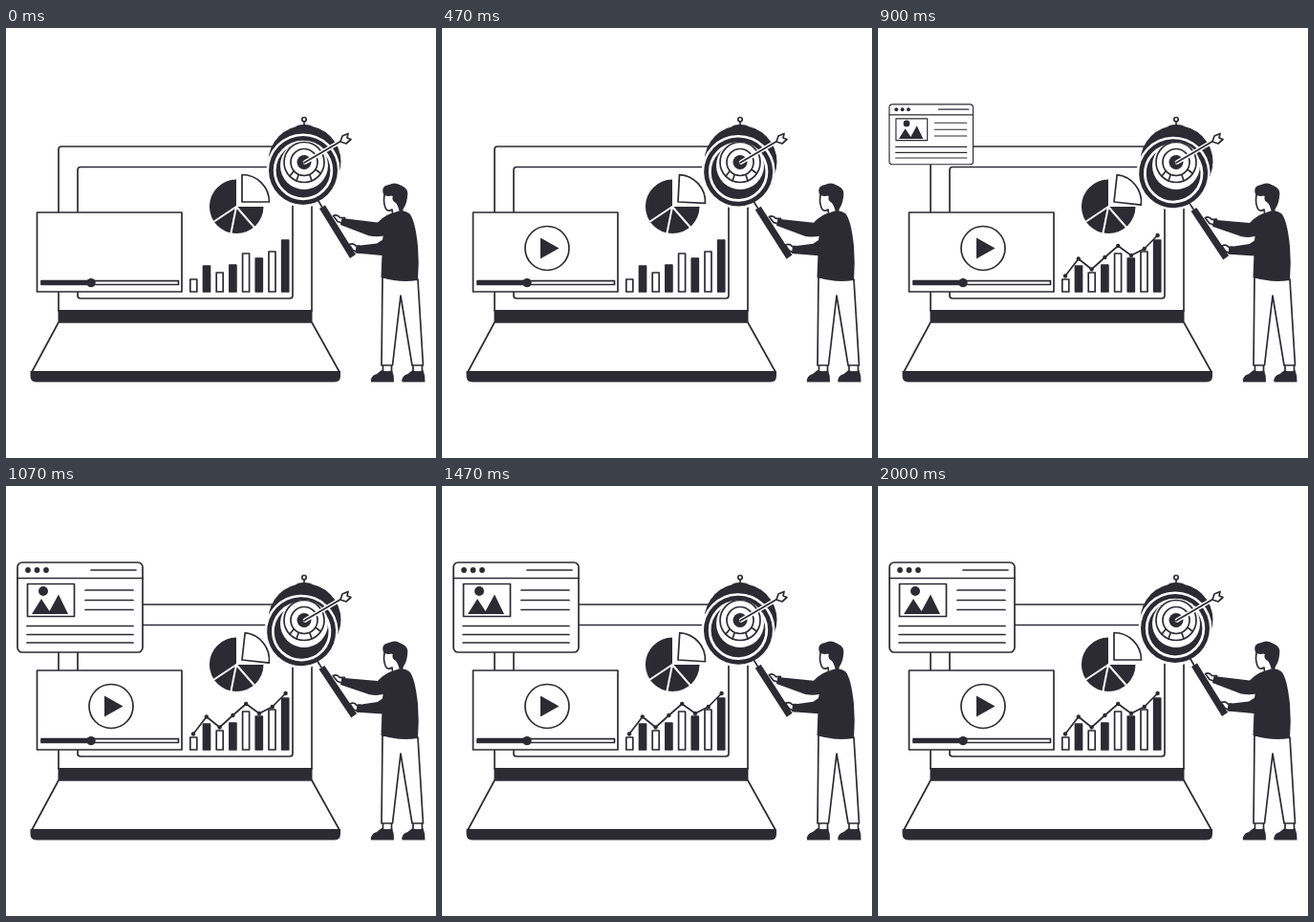
Write an HTML page that moves like this. It is 450 px wide and 450 px high and loops after 2170 ms.

```html
<!DOCTYPE html>
<html lang="en">
<head>
<meta charset="utf-8">
<title>Analytics illustration</title>
<style>
html, body { margin: 0; width: 100%; height: 100%; overflow: hidden; background: #fff; }
svg { display: block; width: 100vw; height: 100vh; }
.o { fill: #fff; stroke: #2c2b33; stroke-width: 1.7; stroke-linejoin: round; stroke-linecap: round; }
.l { fill: none; stroke: #2c2b33; stroke-width: 1.7; stroke-linejoin: round; stroke-linecap: round; }
.d { fill: #2c2b33; }
.w { fill: none; stroke: #fff; stroke-width: 2; stroke-linecap: round; }
</style>
</head>
<body>
<svg viewBox="0 0 450 450">
  <defs>
    <clipPath id="reveal"><rect id="wipe" x="190" y="205" width="0" height="70"/></clipPath>
  </defs>

  <g id="laptop">
    <path class="o" d="M55 296V127q0-3 3-3H317q3 0 3 3V296z"/>
    <rect class="o" x="75" y="145.500" width="225" height="137.500" rx="3"/>
    <path class="o" d="M55 308H320L349 360H27z"/>
    <path class="d" d="M54.500 295H320.500V308H54.500zM25.500 359H350V364q0 6.500-6 6.500H31.500q-6 0-6-6.500z"/>
  </g>

  <g id="pie">
    <path class="d" d="M241 187V158.500A28.300 28.300 0 1 0 269.500 187z"/>
    <path class="w" d="M241 187L217 203M241 187L235 217M241 187L262 211"/>
    <path id="slice" class="o" d="M247 182V153.500A28.500 28.500 0 0 1 275.500 182z"/>
  </g>

  <g id="bars"></g>
  <g id="trend" clip-path="url(#reveal)"></g>

  <g id="window">
    <rect class="o" x="12" y="80" width="131" height="94" rx="5"/>
    <path class="l" d="M12 96.500H143M89 88H136M83 109H133M83 119.500H133M83 129.500H133M22 146.500H133M22 155.500H133M22 164H133"/>
    <circle class="d" cx="23" cy="88" r="2.900"/>
    <circle class="d" cx="32.500" cy="88" r="2.900"/>
    <circle class="d" cx="42" cy="88" r="2.900"/>
    <rect class="o" x="22.500" y="102.500" width="49" height="34"/>
    <circle class="d" cx="39" cy="110" r="5"/>
    <path class="d" d="M27 134L37 118L45.500 131L55 113.500L65 134z"/>
  </g>

  <g id="player">
    <rect class="o" x="32.500" y="193" width="151.500" height="83"/>
    <rect class="o" x="37" y="264.700" width="143.500" height="3.800"/>
    <rect class="d" x="37" y="264.500" width="52" height="4.200"/>
    <circle class="d" cx="89" cy="266.600" r="4.700"/>
  </g>
  <g id="play">
    <circle class="o" cx="110" cy="230.500" r="23"/>
    <path class="d" d="M103 219.500V241.500L122.500 230.500z"/>
  </g>

  <g id="target">
    <circle class="o" cx="312" cy="95.700" r="2.200"/>
    <path class="l" d="M312 98.500V102"/>
    <path class="d" d="M303 104q1-3 9-3t9 3z"/>
    <circle class="d" cx="312.500" cy="140" r="38"/>
  </g>

  <g id="arm">
    <path d="M330 187L361 239" stroke="#fff" stroke-width="10"/>
    <path class="d" d="M328 189L334 185.500L366 237L360 241z"/>
    <circle cx="311" cy="149" r="35" fill="none" stroke="#fff" stroke-width="7"/>
    <path class="l" d="M327 181L330.500 187"/>
    <circle class="d" cx="311" cy="149" r="36"/>
    <circle class="w" cx="311" cy="149" r="29.800" style="stroke-width:2.800"/>
    <path class="o" d="M354 205L347 202.500L342.500 196.500q4-2 7 2l5 0zM369 235L363 232.500L359 226.500q5-2 7 1.500l4 0z"/>
    <path class="d" d="M408 193Q398 194 389 203.500L351.500 199L350 206L380 217.500Q393 220 402 215zM403 216L388 225.500L366.500 228L365.500 235.500L393 238L408 234z"/>
  </g>

  <g id="face">
    <circle cx="312" cy="144" r="25" fill="#fff"/>
    <circle class="l" cx="312" cy="140.500" r="21"/>
    <circle class="l" cx="312" cy="140.500" r="14"/>
    <path class="l" d="M301 150L297 155M306 154L304 160M318 154L320 160M324 148L329 152"/>
    <circle class="d" cx="312" cy="140.500" r="7.500"/>
    <path class="w" d="M313 140.500L353 117" style="stroke-width:4.500"/>
    <path class="l" d="M312 141L353 117"/>
    <path class="o" d="M350 119L352 113L358 110.500L357 115L361 116.500L356 121z"/>
  </g>

  <g id="man">
    <path class="o" d="M394 261L393 353H404.500L413 280L425 353H436.500L431 263zM394.500 353V360H403.500V353zM426 353V360H435.500V353z"/>
    <path class="d" id="shoe" d="M393 358Q399 361 404 358Q406.500 364 406 370.500H382Q381 364 388 362z"/>
    <use href="#shoe" x="32.500"/>
    <path class="o" d="M397 171Q394 181 397 188Q399 193 404 190L405 197H415L414 180z"/>
    <path class="d" d="M403 195Q414 188 422 194Q428 200 431 228Q432.500 246 431 264Q412 267 392.500 261L394 222Q396 204 403 195z"/>
    <path class="d" d="M395 174Q392 165 401 164Q407 160.500 414 165Q422 168 420 177.500Q419 187 412 194Q411 187 408 183Q403 181 405 175Q399 177.500 395 174z"/>
  </g>
</svg>
<script>
const LOOP = 2170;
const $ = id => document.getElementById(id);

const tops = [263, 249, 256, 248, 236, 241, 234, 222];
$("bars").innerHTML = tops.map((y, i) =>
  `<rect class="o" x="${192.8 + i * 13.7}" y="${y}" width="7" height="${276 - y}"
    ${i % 2 ? 'style="fill:#2c2b33"' : ""}/>`).join("");

const peaks = [259.5, 241.5, 252.5, 240, 228, 238, 231, 217].map((y, i) => [196 + i * 13.8, y]);
$("trend").innerHTML = `<polyline class="l" points="${peaks.join(" ")}"/>` +
  peaks.map(([x, y]) => `<circle class="d" cx="${x}" cy="${y}" r="2.200"/>`).join("");

const part = (t, from, to) => Math.min(1, Math.max(0, (t - from) / (to - from)));

function draw(t) {
  const rise = part(t, 15, 400);
  $("play").setAttribute("opacity", rise);
  $("play").setAttribute("transform", `translate(0 ${34 * (1 - rise) ** 2})`);

  $("wipe").setAttribute("width", 112 * part(t, 490, 830));

  const grow = part(t, 640, 1030);
  $("window").setAttribute("visibility", grow ? "visible" : "hidden");
  $("window").setAttribute("transform", `translate(11.500 79.500) scale(${grow}) translate(-11.500 -79.500)`);

  // one slow swing there and back, then a short rest
  const swing = (1 - Math.cos(2 * Math.PI * part(t, 0, 2000))) / 2;
  $("slice").setAttribute("transform", `rotate(${6.5 * swing} 247 182)`);
  $("arm").setAttribute("transform", `rotate(${-2 * swing} 405 205)`);
}

const start = performance.now();
function tick() {
  draw((performance.now() - start) % LOOP);
  requestAnimationFrame(tick);
}
draw(0);
requestAnimationFrame(tick);
</script>
</body>
</html>
```
